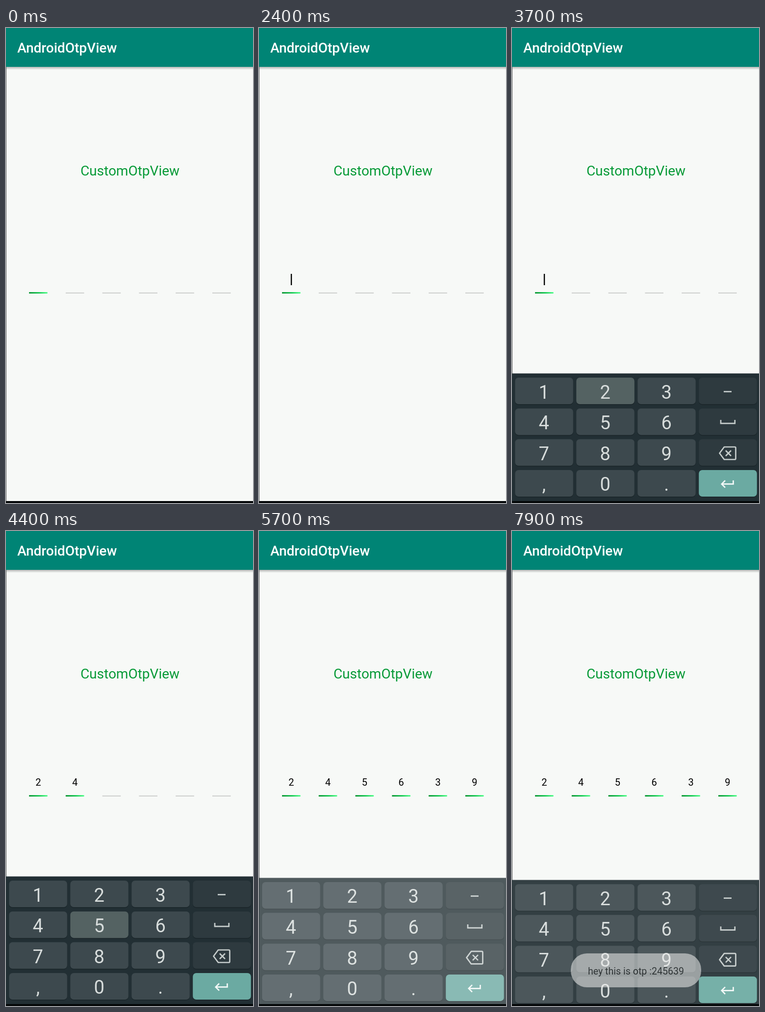
Recreate the animation shown at these times as an HTML page. Size 504 by 966 pixels, loop 8000 ms.

```html
<!DOCTYPE html>
<html lang="en">
<head>
<meta charset="utf-8">
<title>OTP input</title>
<style>
  html, body { margin: 0; width: 100%; height: 100%; overflow: hidden; background: #f7f9f7; }
  svg { display: block; width: 504px; height: 966px; font-family: Roboto, sans-serif; }
</style>
</head>
<body>
<svg id="stage" viewBox="0 0 504 966" xmlns="http://www.w3.org/2000/svg">
  <defs>
    <linearGradient id="green">
      <stop offset="0" stop-color="#00912c"/>
      <stop offset=".55" stop-color="#0fc84d"/>
      <stop offset="1" stop-color="#4bff86"/>
    </linearGradient>
    <linearGradient id="shade" x2="0" y2="1">
      <stop offset="0" stop-color="#000" stop-opacity=".27"/>
      <stop offset="1" stop-color="#000" stop-opacity="0"/>
    </linearGradient>
  </defs>
  <rect width="504" height="966" fill="#f7f9f7"/>
  <rect y="79" width="504" height="6" fill="url(#shade)"/>
  <rect y="79" width="1" height="883" fill="#6b6e6d"/>
  <rect width="504" height="79" fill="#008475"/>
  <text x="23" y="50" font-size="28" font-weight="500" fill="#fff">AndroidOtpView</text>
  <text x="253" y="300" font-size="28" fill="#079a37" text-anchor="middle">CustomOtpView</text>
  <g id="cells"></g>
  <rect id="cursor" x="64.8" y="500" width="2.4" height="23" fill="#000"/>
  <g id="keyboard">
    <rect y="702.5" width="504" height="264" fill="#222f34"/>
    <g id="keys"></g>
    <g fill="none" stroke="#c5cccb" stroke-width="2.7">
      <path d="M432 739.5h16"/>
      <path d="M426 797v7.2h28.8V797"/>
      <path d="M433 852h21.500q2 0 2 2v21.500q0 2-2 2H433L423.500 864.700Z" stroke-linejoin="round"/>
      <path d="M436 859.200l11 11m0-11l-11 11"/>
      <path d="M451.500 920v7.400H428m7-7.200l-7.200 7.200 7.200 7.200" stroke="#f2f8f7"/>
    </g>
  </g>
  <rect y="962" width="504" height="4" fill="#050809"/>
  <g id="toast">
    <rect x="120" y="859" width="266" height="69" rx="33" fill="#edeeed"/>
    <text x="253" y="901.500" font-size="19.6" fill="#202120" text-anchor="middle">hey this is otp :245639</text>
  </g>
</svg>
<script>
const LOOP = 8000, STEP = 100;
const NS = 'http://www.w3.org/2000/svg';
const byId = id => document.getElementById(id);
const clamp = v => Math.min(1, Math.max(0, v));
const progress = (t, start, length) => clamp((t - start) / length);

// key press, digit shown, key release
const typed = [
  ['2', 3700, 3800, 3900],
  ['4', 4100, 4300, 4300],
  ['5', 4400, 4500, 4600],
  ['6', 4900, 5000, 5100],
  ['3', 5200, 5300, 5300],
  ['9', 5500, 5600, 5600]
];

function add(parent, tag, attrs, text) {
  const el = document.createElementNS(NS, tag);
  for (const name in attrs) el.setAttribute(name, attrs[name]);
  if (text) el.textContent = text;
  parent.append(el);
  return el;
}

function show(el, visible) {
  el.setAttribute('visibility', visible ? 'visible' : 'hidden');
}

const cells = typed.map(([digit], i) => {
  const x = 47 + i * 74.8, g = byId('cells');
  const grey = add(g, 'rect', { x, y: 537.8, width: 37.6, height: 2.2, fill: '#d0d2d0' });
  const green = add(g, 'rect', { x, y: 537.2, width: 37.6, height: 2.8, fill: 'url(#green)' });
  const label = add(g, 'text', {
    x: x + 18.8, y: 518, 'font-size': 20, 'text-anchor': 'middle', fill: '#000'
  }, digit);
  return { grey, green, label };
});

const keys = {};
['123-', '456_', '789<', ',0.>'].forEach((row, r) => {
  [...row].forEach((name, c) => {
    const x = 6.2 + c * 125, y = 711 + r * 62.65, g = byId('keys');
    const fill = name === '>' ? '#6baaa2' : c === 3 ? '#2e3a3f' : '#3d494e';
    const box = { x, width: 118.6, height: 54, rx: 7 };
    add(g, 'rect', { ...box, y: y + 1.5, fill: '#1a2529' });
    keys[name] = add(g, 'rect', { ...box, y, fill });
    if (c < 3) add(g, 'text', {
      x: x + 59, y: y + 42.5, 'font-size': 38, 'text-anchor': 'middle', fill: '#d7dcdb'
    }, name);
  });
});

function slide(t) {
  if (t < 5600) {
    const left = 1 - progress(t, 2870, 300);
    return { alpha: 1 - left ** 3, drop: 38 * left ** 2 };
  }
  if (t < 7000) {
    const p = progress(t, 5610, 150);
    return { alpha: 1 - p ** 3, drop: 38 * p ** 5 };
  }
  const left = 1 - progress(t, 7730, 300);
  return { alpha: 1 - left ** 3, drop: 38 * left ** 2 };
}

function draw(t) {
  typed.forEach(([digit, down, shown, up], i) => {
    const on = t >= shown, lit = on || i === 0;
    show(cells[i].label, on);
    show(cells[i].green, lit);
    show(cells[i].grey, !lit);
    keys[digit].setAttribute('fill', t >= down && t < up ? '#546262' : '#3d494e');
  });
  show(byId('cursor'), t < 3800 && Math.floor((t + 100) / 500) % 2 === 1);

  const { alpha, drop } = slide(t);
  byId('keyboard').setAttribute('opacity', alpha);
  byId('keyboard').setAttribute('transform', `translate(0 ${drop})`);

  const fadeIn = 1 - (1 - progress(t, 5730, 500)) ** 2;
  const fadeOut = 1 - progress(t, 7565, 500) ** 2;
  byId('toast').setAttribute('opacity', fadeIn * fadeOut);
}

const start = performance.now();
function tick() {
  const t = (performance.now() - start) % LOOP;
  draw(Math.floor(t / STEP) * STEP);
  requestAnimationFrame(tick);
}
tick();
</script>
</body>
</html>
```
